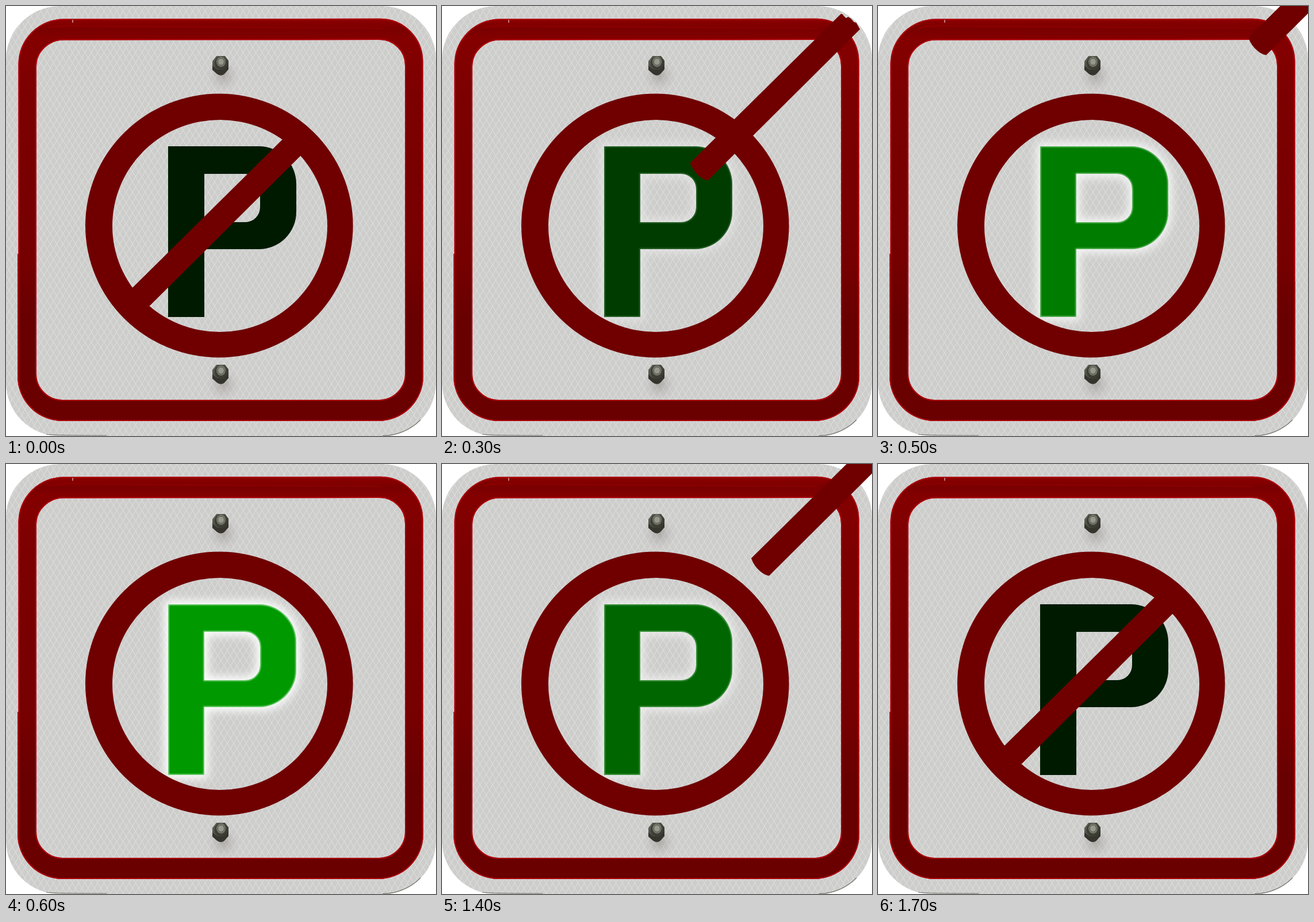
An HTML page that plays this animation: 748x748 px, repeating every 1.8 s.

```html
<!DOCTYPE html>
<html lang="en">
<head>
<meta charset="utf-8">
<title>Parking sign</title>
<style>
  html, body { margin: 0; width: 100%; height: 100%; overflow: hidden; background: #fff; }
  svg { display: block; width: 100vw; height: 100vh; }
</style>
</head>
<body>
<svg viewBox="0 0 748 748">
  <defs>
    <pattern id="mesh" width="11" height="18" patternUnits="userSpaceOnUse">
      <path d="M0 0L5.5 9L11 0M0 18L5.5 9L11 18" fill="none" stroke="#fff" stroke-opacity=".3" stroke-width="1.1"/>
    </pattern>
    <pattern id="redMesh" width="11" height="18" patternUnits="userSpaceOnUse">
      <path d="M0 0L5.5 9L11 0M0 18L5.5 9L11 18" fill="none" stroke="#a00000" stroke-opacity=".22" stroke-width="1.2"/>
    </pattern>
    <linearGradient id="red" x2="0" y2="1">
      <stop offset="0" stop-color="#8c0000"/>
      <stop offset=".025" stop-color="#7a0000"/>
      <stop offset=".05" stop-color="#840000"/>
      <stop offset=".2" stop-color="#7c0000"/>
      <stop offset=".6" stop-color="#760000"/>
      <stop offset=".75" stop-color="#680000"/>
      <stop offset="1" stop-color="#6a0000"/>
    </linearGradient>
    <radialGradient id="shade">
      <stop offset="0" stop-color="#857d78" stop-opacity=".45"/>
      <stop offset="1" stop-color="#b8b0ac" stop-opacity="0"/>
    </radialGradient>
    <linearGradient id="steel" x2="1" y2="1">
      <stop offset="0" stop-color="#66675c"/>
      <stop offset=".5" stop-color="#45453c"/>
      <stop offset="1" stop-color="#2b2a25"/>
    </linearGradient>
    <filter id="soft" x="-20%" y="-20%" width="140%" height="140%"><feGaussianBlur stdDeviation="8"/></filter>
    <filter id="rimSoft"><feGaussianBlur stdDeviation="1.3"/></filter>
    <path id="plate" d="M95 0H653A95 93 0 0 1 748 93V655A93 93 0 0 1 655 748H93A93 93 0 0 1 0 655V93A95 93 0 0 1 95 0Z"/>
    <path id="p" fill-rule="evenodd" d="M282 244H440A65 66 0 0 1 505 310V358A65 65 0 0 1 440 423H345V541H282ZM345 292V376H416A26 26 0 0 0 442 350V318A26 26 0 0 0 416 292Z"/>
    <clipPath id="inP"><use href="#p" clip-rule="evenodd"/></clipPath>
    <g id="bolt">
      <ellipse cx="5" cy="18" rx="30" ry="30" fill="url(#shade)"/>
      <path d="M-14-7L-7-16H8L14-8V7L7 15Q1 20-6 15L-14 8Z" fill="url(#steel)"/>
      <path d="M-14 1L-6 8H7L14 0V7L7 15Q1 20-6 15L-14 8Z" fill="#35342d"/>
      <ellipse cx="0" cy="-4" rx="10" ry="11" fill="#3c3d34"/>
      <ellipse cx="1" cy="-6" rx="8" ry="9" fill="#74766a"/>
      <ellipse cx="1" cy="-6" rx="5.5" ry="6" fill="#96988c" stroke="#55574d"/>
    </g>
  </defs>

  <use href="#plate" fill="#cdcdcc"/>
  <use href="#plate" fill="url(#mesh)"/>
  <path d="M70 745Q82 747 175 747M655 747.5A93 93 0 0 0 721 720" fill="none" stroke="#77756c" stroke-width="1.2"/>

  <g fill-rule="evenodd">
    <path id="border" d="M100 23.5L652 22.8A73 74 0 0 1 724.5 97V480H725V644A77 77 0 0 1 648 721H98A77 77 0 0 1 21 644V432H22.5V101A77.5 77.5 0 0 1 100 23.5ZM101 58.5A49 47 0 0 0 52 105V640A47 46 0 0 0 99 686H648A47 46 0 0 0 695 640V103A45 45 0 0 0 650 58Z" fill="url(#red)" stroke="#ac0008" stroke-width="2"/>
    <use href="#border" style="fill:url(#redMesh)"/>
    <path d="M72 38Q100 33 130 35L655 39" fill="none" stroke="#960000" stroke-width="1.2"/>
    <path d="M116 24V29" stroke="#d8a0a0" stroke-width="1.5"/>
  </g>

  <use href="#bolt" x="373" y="103"/>
  <use href="#bolt" x="373" y="640"/>

  <g id="glow">
    <use href="#p" fill="#fff" stroke="#fff" stroke-width="12" filter="url(#soft)"/>
  </g>
  <use href="#p" id="letter"/>
  <g id="rim" clip-path="url(#inP)">
    <use href="#p" fill="none" stroke="#d8ffd8" stroke-width="3" filter="url(#rimSoft)"/>
  </g>

  <g fill="#700000">
    <path fill-rule="evenodd" d="M138 382a232.8 229.5 0 1 0 465.6 0a232.8 229.5 0 1 0-465.6 0ZM185 382.5a187 184.5 0 1 1 374 0a187 184.5 0 1 1-374 0Z"/>
    <path id="bar" d="M219 491L479 234Q483 229 486 235L490 239L494 237L499 240L504 246L508 247L514.5 258.5L250 521.5Q242 520 235 514Q224 505 219 491Z"/>
  </g>
</svg>
<script>
  const get = id => document.getElementById(id);
  const [bar, letter, glow, rim] = ["bar", "letter", "glow", "rim"].map(get);
  const greens = [26, 27, 60, 102, 124, 153];

  function draw(now) {
    const tick = Math.floor(now % 1800 / 100);
    // The bar slides out in five steps, rests off stage, then returns.
    const step = Math.max(0, Math.min(5, tick - 1, 17 - tick));
    bar.setAttribute("transform", `translate(${106.3 * step} ${-109 * step})`);
    letter.setAttribute("fill", `rgb(0 ${greens[step]} 0)`);
    glow.setAttribute("opacity", step / 5);
    rim.setAttribute("opacity", step * 0.14);
    requestAnimationFrame(draw);
  }
  draw(performance.now());
</script>
</body>
</html>
```
